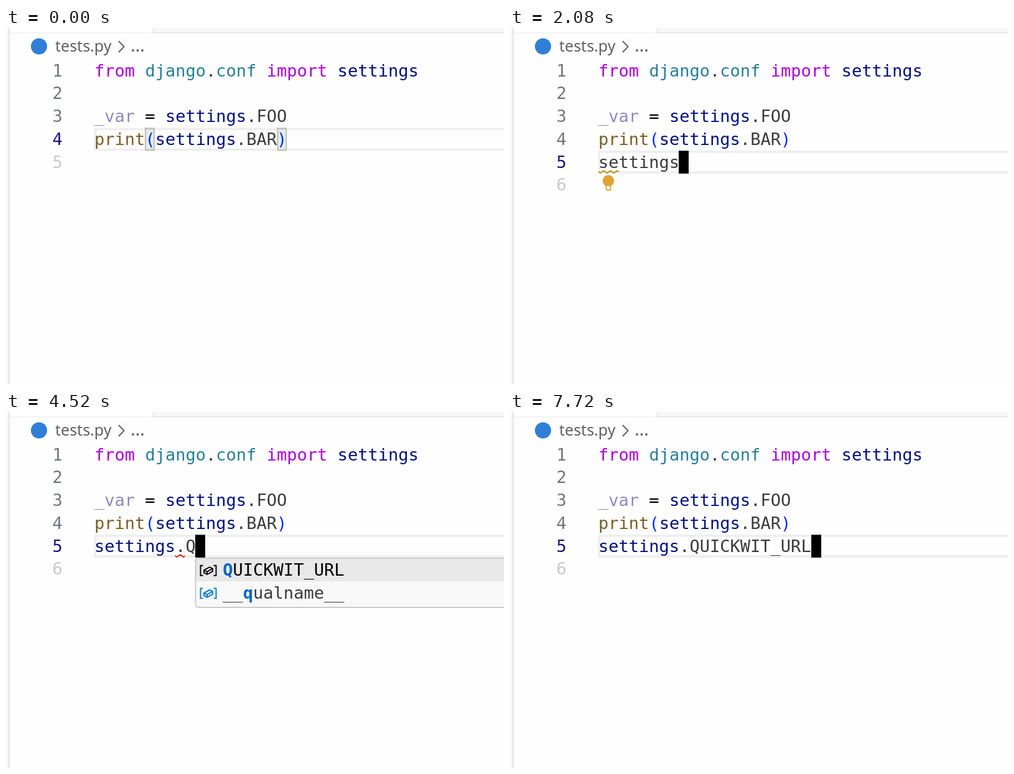
Animation, 800 px wide and 572 px high, one loop 8000 ms. Source, as an HTML page with a canvas:

```html
<!DOCTYPE html>
<html lang="en">
<head>
<meta charset="utf-8">
<title>Editor completion</title>
<style>
  html, body { margin: 0; width: 100%; height: 100%; overflow: hidden; background: #fefefe; }
  canvas { display: block; }
</style>
</head>
<body>
<canvas id="stage" width="800" height="572"></canvas>
<script>
const ctx = document.getElementById("stage").getContext("2d");
const LOOP = 8000;
const LEFT = 142;
const SCALE = 1.931; // stage pixels per editor pixel
const SIZE = 14 * SCALE;
const ADVANCE = SIZE * 0.60205;
const LINE = 19 * SCALE;
const BASELINE = 27.35;
const MONO = '"DejaVu Sans Mono", monospace';
const SANS = '"Noto Sans", sans-serif';

const INK = "#3b3b3b", NAVY = "#001080", TEAL = "#267f99", MAGENTA = "#af00db";
const BLUE = "#0431fa", MATCH = "#0066bf", WARN = "#bf8803", ERROR = "#e51400";
const ICON_COLORS = { word: INK, variable: "#007acc", method: "#652d90", type: "#d67e00" };

const CODE = [
  [["from ", MAGENTA], ["django", TEAL], [".", INK], ["conf", TEAL], [" import ", MAGENTA], ["settings", NAVY]],
  [],
  [["_var", "#8a8ac2"], [" = ", "#000"], ["settings", NAVY], [".FOO", INK]],
  [["print", "#795e26"], ["(", BLUE], ["settings", NAVY], [".BAR", INK], [")", BLUE]],
];

const rows = (kind, names) => names.split(" ").map(name => ({ kind, name }));

const LISTS = {
  s: {
    column: 1, query: "s",
    items: [...rows("word", "S"), ...rows("variable", "s"), ...rows("word", "S"),
      { kind: "variable", name: "s", detail: "prome" },
      ...rows("variable", "settings"), ...rows("type", "set"), ...rows("method", "setattr"),
      ...rows("type", "slice"), ...rows("method", "sorted"), ...rows("type", "str")],
  },
  se: {
    column: 1, query: "se",
    items: [...rows("variable", "settings"), ...rows("type", "set"), ...rows("method", "setattr"),
      ...rows("type", "slice"), ...rows("method", "sorted"),
      ...rows("type", "staticmethod super SyntaxError SystemError SystemExit")],
  },
  set: {
    column: 1, query: "set",
    items: [...rows("variable", "settings"), ...rows("type", "set"), ...rows("method", "setattr"),
      ...rows("type", "staticmethod SystemExit StopIteration StopAsyncIteration"),
      ...rows("type", "AssertionError BaseException BaseExceptionGroup")],
  },
  members: {
    column: 9, query: "",
    items: [...rows("variable", "BAR FOO PG_HOST QUICKWIT_URL WEIGHTS"), ...rows("method", "configure"),
      ...rows("variable", "configured __annotations__ __bool__ __class__")],
  },
  q: { column: 10, query: "q", items: rows("variable", "QUICKWIT_URL __qualname__") },
};

// Each track is a list of [start time, value].
const TYPED = [[0, null], [480, ""], [920, "s"], [1280, "se"], [1560, "set"], [2080, "settings"],
  [2800, "settings."], [4480, "settings.Q"], [5800, "settings.QUICKWIT_URL"]];
const POPUP = [[0, null], [1040, "s"], [1320, "se"], [1600, "set"], [2080, null],
  [2880, "members"], [4520, "q"], [5800, null]];
const CURSOR = [[0, false], [280, true], [2600, false], [2800, true], [3320, false], [3800, true],
  [4320, false], [4480, true], [5040, false], [5480, true], [6280, false], [6720, true],
  [7280, false], [7720, true]];
const SQUIGGLE = [[0, null], [1520, [0, 2, WARN]], [2520, [0, 8, WARN]], [3080, [8, 1, ERROR]], [4760, null]];
const BULB = [[0, false], [2080, true], [2280, false]];
const RESOLVED = [[0, false], [2520, true]];

const at = (track, time) => track.findLast(([start]) => start <= time)[1];
const columnX = column => LEFT + column * ADVANCE;
// Overlays sit on whole editor pixels, unlike the text.
const overlayX = column => LEFT + Math.round(column * ADVANCE / SCALE) * SCALE;
const lineTop = line => 197.2 + (line - 5) * LINE;

function text(string, x, y, color, font = `${SIZE}px ${MONO}`) {
  ctx.font = font;
  ctx.fillStyle = color;
  ctx.fillText(string, x, y);
}

function box(x, y, w, h, color) {
  ctx.fillStyle = color;
  ctx.fillRect(x, y, w, h);
}

function path(points, closed = false) {
  ctx.beginPath();
  points.forEach(([x, y]) => ctx.lineTo(x, y));
  if (closed) ctx.closePath();
  ctx.stroke();
}

function drawHeader() {
  box(0, 0, 800, 572, "#fefefe");
  box(0, 0, 4, 572, "#f8f8f8");
  box(237, 0, 563, 8, "#f8f8f8");
  box(4, 0, 2, 572, "#e3e3e3");
  box(6, 7, 230, 1.5, "#f1f1f1");
  box(236, 0, 1.5, 8, "#e3e3e3");
  box(236, 7, 564, 1.5, "#e3e3e3");

  ctx.fillStyle = "#2f7fd6";
  ctx.beginPath();
  ctx.arc(53, 29.5, 13, 0, Math.PI * 2);
  ctx.fill();

  text("tests.py", 79, 38, "#616161", `25px ${SANS}`);
  text("…", 200, 38, "#616161", `29px ${SANS}`);
  ctx.strokeStyle = "#616161";
  ctx.lineWidth = 2;
  path([[181, 21], [189.5, 30], [181, 39]]);
}

function drawTokens(tokens, line) {
  let column = 0;
  for (const [string, color] of tokens) {
    text(string, columnX(column), lineTop(line) + BASELINE, color);
    column += string.length;
  }
}

function drawActiveLine(line) {
  ctx.strokeStyle = "#eeeeee";
  ctx.lineWidth = 3.6;
  ctx.strokeRect(LEFT + 1.3, lineTop(line) + 1.8, 700, LINE - 3.6);
}

function drawBracketBox(column) {
  const x = overlayX(column), y = lineTop(4);
  box(x, y, 15.5, LINE, "rgba(0, 100, 0, 0.1)");
  ctx.strokeStyle = "#b9b9b9";
  ctx.lineWidth = 1.8;
  ctx.strokeRect(x + 0.8, y + 0.8, 14, LINE - 1.6);
}

function drawSquiggle([column, length, color]) {
  const x = overlayX(column), width = length * ADVANCE, points = [];
  for (let i = -1; i * 5.5 < width + 6; i++) {
    points.push([x + 3 + i * 5.5, i % 2 ? 229.4 : 233]);
  }
  ctx.save();
  ctx.beginPath();
  ctx.rect(x, 227, width, 8);
  ctx.clip();
  ctx.strokeStyle = color;
  ctx.lineWidth = 1.8;
  path(points);
  ctx.restore();
}

function drawBulb() {
  ctx.fillStyle = ctx.strokeStyle = "#dfa336";
  ctx.lineWidth = 2;
  ctx.beginPath();
  ctx.arc(158, 245.5, 9.2, Math.PI * 0.78, Math.PI * 2.22);
  ctx.lineTo(162, 254);
  ctx.lineTo(154, 254);
  ctx.fill();
  path([[154.5, 252], [154.5, 259], [156, 260.5], [160, 260.5], [161.5, 259], [161.5, 252]]);
}

const diamond = (x, y, r) => path([[x - r, y], [x, y - r], [x + r, y], [x, y + r]], true);

// Icons are drawn around their own centre.
const ICONS = {
  word() {
    ctx.beginPath();
    ctx.roundRect(-12.5, -9, 25, 18, 2.5);
    ctx.stroke();
    path([[-7.5, -3], [7.5, -3]]);
    path([[-7.5, 3], [7.5, 3]]);
  },
  variable() {
    for (const side of [-1, 1]) {
      path([[side * 8.5, -8], [side * 12.5, -8], [side * 12.5, 8], [side * 8.5, 8]]);
    }
    path([[-7, -0.5], [2, -5.5], [7, -3], [7, 1.5], [-2, 6.3], [-7, 3.7]], true);
    path([[-7, -0.5], [-2, 2], [7, -3]]);
    path([[-2, 2], [-2, 6.3]]);
  },
  method() {
    path([[0, -12.5], [11, -7], [11, 6.5], [0, 12.5], [-11, 6.5], [-11, -7]], true);
    path([[-11, -7], [0, -1.5], [11, -7]]);
    path([[0, -1.5], [0, 12.5]]);
  },
  type() {
    path([[-12, -4], [-4.5, -11.5], [-0.5, -7.5], [-8, 0]], true);
    path([[-4, -3], [5, -3]]);
    path([[-1, -3], [-1, 8], [5, 8]]);
    diamond(8.5, -3, 3.8);
    diamond(8.5, 8, 3.8);
  },
};

function drawIcon(kind, x, y, color) {
  ctx.save();
  ctx.translate(x, y);
  ctx.strokeStyle = color;
  ctx.lineWidth = 1.9;
  ICONS[kind]();
  ctx.restore();
}

function drawLabel(name, query, x, y, color) {
  let matched = 0;
  [...name].forEach((char, i) => {
    const hit = char.toLowerCase() === query[matched];
    if (hit) matched++;
    text(char, x + i * ADVANCE, y, hit ? MATCH : color, `${hit ? "bold " : ""}${SIZE}px ${MONO}`);
  });
}

function drawPopup({ column, query, items }) {
  const left = Math.round(overlayX(column)) + 0.5, top = 235;
  ctx.beginPath();
  ctx.roundRect(left, top, 900, items.length * LINE + 5.5, 5);
  ctx.fillStyle = "#f8f8f8";
  ctx.fill();
  box(left, top + 0.5, 900, LINE, "#e8e8e8");
  ctx.strokeStyle = "#c4c4c4";
  ctx.lineWidth = 1.7;
  ctx.stroke();

  items.forEach(({ kind, name, detail }, i) => {
    const middle = top + 19 + i * LINE, selected = i === 0;
    drawIcon(kind, left + 20.5, middle + (kind === "variable" ? 0.7 : 0), selected ? "#000" : ICON_COLORS[kind]);
    drawLabel(name, query, left + 43.7, middle + 9, selected ? "#000" : INK);
    if (detail) text(detail, 735, middle + 8.5, "#7a7a7a", `${SIZE * 0.85}px ${MONO}`);
  });
}

function drawLineNumbers(active) {
  for (let line = 1; line <= active + 1; line++) {
    const color = line === active ? "#171184" : line > active ? "#c6c8ca" : "#6e7681";
    text(String(line), 74.5, lineTop(line) + BASELINE, color);
  }
}

function draw(time) {
  const typed = at(TYPED, time);
  const active = typed === null ? 4 : 5;
  const popup = at(POPUP, time), squiggle = at(SQUIGGLE, time);

  drawHeader();
  drawActiveLine(active);
  drawLineNumbers(active);
  if (active === 4) [5, 18].forEach(drawBracketBox);
  CODE.forEach((tokens, i) => drawTokens(tokens, i + 1));
  if (typed) {
    drawTokens([[typed.slice(0, 8), at(RESOLVED, time) ? NAVY : INK], [typed.slice(8), INK]], 5);
  }
  if (squiggle) drawSquiggle(squiggle);
  if (at(BULB, time)) drawBulb();
  if (at(CURSOR, time)) {
    const column = active === 4 ? 19 : typed.length;
    box(Math.round(overlayX(column)), lineTop(active), 16, LINE, "#000");
  }
  if (popup) drawPopup(LISTS[popup]);
}

const start = performance.now();
function tick() {
  draw((performance.now() - start) % LOOP);
  requestAnimationFrame(tick);
}
tick();
</script>
</body>
</html>
```
